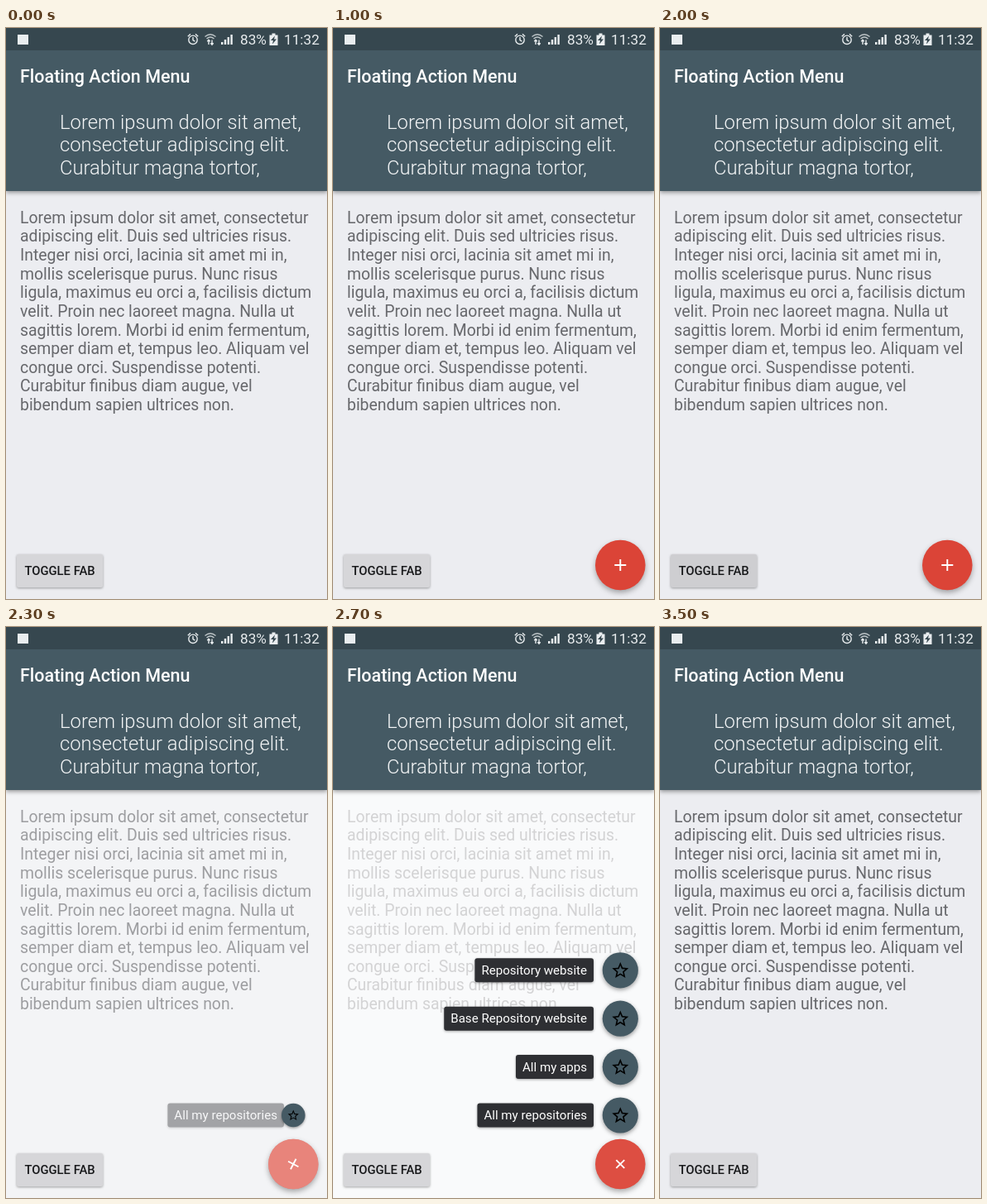
Write an HTML page that moves like this. It is 388 px wide and 690 px high and loops after 3600 ms.

```html
<!DOCTYPE html>
<html lang="en">
<head>
<meta charset="utf-8">
<title>Floating Action Menu</title>
<style>
  html, body { margin: 0; height: 100%; overflow: hidden; background: #ecedf1; }
  svg { display: block; width: 388px; height: 690px; font-family: Roboto, sans-serif; }
  .body { font-size: 19.4px; fill: #67686c; }
  .lead { font-size: 23.8px; font-weight: 300; fill: #f3f5f6; }
  .title { font-size: 21.5px; font-weight: 500; fill: #fff; }
  .status { font-size: 17.2px; fill: #e9edef; }
  .caption { font-size: 14.8px; font-weight: 500; fill: #17181a; }
  .label { font-size: 15.1px; fill: #fff; }
  .low { filter: drop-shadow(0 1px 1.5px rgba(0,0,0,.35)); }
  .mid { filter: drop-shadow(0 2px 2.5px rgba(0,0,0,.38)); }
  .high { filter: drop-shadow(0 3px 3px rgba(0,0,0,.32)); }
</style>
</head>
<body>
<svg viewBox="0 0 388 690">
  <rect width="388" height="690" fill="#ecedf1"/>
  <g id="body" class="body"></g>
  <rect id="veil" y="197" width="388" height="493" fill="#fff"/>

  <rect class="mid" y="-10" width="388" height="207" fill="#455a64"/>
  <rect width="388" height="27" fill="#36474f"/>
  <g fill="#e9edef">
    <rect x="14" y="8" width="13" height="12"/>
    <path d="M260 20v-3h2.4v3zM263.8 20v-6h2.4v6zM267.6 20v-9h2.4v9zM271.4 20V8h2.4v12z"/>
    <path d="M318.5 8.5h3V6.5h4v2h3V21h-10z"/>
    <path d="M325 9.5l-5 5.5h3l-1 4.5 5-6h-3z" fill="#36474f"/>
  </g>
  <g fill="none" stroke="#e9edef" stroke-width="1.4">
    <circle cx="226" cy="14.3" r="5.2"/>
    <path d="M226 11v3.6l2.4 1.5M219.8 10.2l3.2-2.9M232.2 10.2l-3.2-2.9"/>
    <path d="M240.5 10.5q6.5-5.5 13 0M242.5 13q4.5-3.8 9 0" opacity=".75"/>
    <path d="M245 20v-5.5M243.3 16.2l1.7-1.9 1.7 1.9M249 14.5V20M247.3 18.2l1.7 1.9 1.7-1.9"/>
  </g>
  <text class="status" x="283" y="20">83%</text>
  <text class="status" x="336" y="20">11:32</text>
  <text class="title" x="17" y="65.5">Floating Action Menu</text>
  <g id="lead" class="lead"></g>

  <rect id="button" class="low" x="13" y="636" width="104" height="40" rx="2"/>
  <text class="caption" x="65" y="661.3" text-anchor="middle">TOGGLE FAB</text>

  <g id="items"></g>
  <g id="fab" class="high">
    <circle r="30.3" fill="#db4437"/>
    <circle id="glow" r="30.3" fill="#fff"/>
    <path id="plus" d="M-7 0H7M0-7V7" stroke="#fff" stroke-width="1.9"/>
  </g>
</svg>
<script>
const LOOP = 3600, STEP = 200;
const CX = 347.3, FAB_Y = 649, LABEL_RIGHT = 315, SLIDE = 62;
const STAR = 'M22 9.24l-7.19-.62L12 2 9.19 8.63 2 9.24l5.46 4.73L5.82 21 12 17.27 18.18 21l-1.63-7.03z' +
  'M12 15.4l-3.76 2.27 1-4.28-3.32-2.88 4.38-.38L12 6.1l1.71 4.04 4.38.38-3.32 2.88 1 4.28z';

const $ = id => document.getElementById(id);
const clamp = v => Math.min(1, Math.max(0, v));
const ramp = (t, start, length = STEP) => clamp((t - start) / length);
const between = (t, show, hide) => ramp(t, show) - ramp(t, hide);
const overshoot = t => (t - 1) ** 2 * (3 * (t - 1) + 2) + 1;
const press = (t, start) => ramp(t, start, 80) - ramp(t, start + 150, 300);

function add(parent, tag, attrs = {}, text = '') {
  const node = document.createElementNS('http://www.w3.org/2000/svg', tag);
  for (const key in attrs) node.setAttribute(key, attrs[key]);
  node.textContent = text;
  return parent.appendChild(node);
}

function paragraph(id, x, y, leading, lines) {
  lines.forEach((line, i) => add($(id), 'text', { x, y: y + i * leading }, line));
}

paragraph('lead', 65, 121.5, 27.9, [
  'Lorem ipsum dolor sit amet,', 'consectetur adipiscing elit.', 'Curabitur magna tortor,'
]);
paragraph('body', 17, 235.6, 22.65, [
  'Lorem ipsum dolor sit amet, consectetur',
  'adipiscing elit. Duis sed ultricies risus.',
  'Integer nisi orci, lacinia sit amet mi in,',
  'mollis scelerisque purus. Nunc risus',
  'ligula, maximus eu orci a, facilisis dictum',
  'velit. Proin nec laoreet magna. Nulla ut',
  'sagittis lorem. Morbi id enim fermentum,',
  'semper diam et, tempus leo. Aliquam vel',
  'congue orci. Suspendisse potenti.',
  'Curabitur finibus diam augue, vel',
  'bibendum sapien ultrices non.'
]);

const items = [
  ['All my repositories', 2267, 3225],
  ['All my apps', 2307, 3160],
  ['Base Repository website', 2348, 3097],
  ['Repository website', 2400, 2956]
].map(([name, show, hide], i) => {
  const y = 590 - i * 58.4;
  const label = add($('items'), 'g', { class: 'low' });
  const plate = add(label, 'rect', { y: -14.5, height: 29, rx: 3, fill: '#2e2f33' });
  const text = add(label, 'text', { class: 'label', x: -8, y: 5.2, 'text-anchor': 'end' }, name);
  const width = text.getComputedTextLength() + 16;
  plate.setAttribute('x', -width);
  plate.setAttribute('width', width);
  const disc = add($('items'), 'g', { class: 'mid' });
  add(disc, 'circle', { r: 21.6, fill: '#455a64' });
  add(disc, 'path', { d: STAR, transform: 'translate(-12 -11.8)' });
  return { label, disc, y, show, hide };
});

function place(node, x, y, scale = 1) {
  node.setAttribute('transform', `translate(${x} ${y}) scale(${scale})`);
  node.style.display = scale > 0.001 ? '' : 'none';
}

function draw(t) {
  const open = between(t, 2200, 2958);
  $('veil').setAttribute('opacity', 0.71 * open);

  const pressed = [500, 1000, 1710, 3000].reduce((sum, start) => sum + press(t, start), 0);
  const shade = 214 - 16 * pressed;
  $('button').setAttribute('fill', `rgb(${shade},${shade},${shade + 3})`);

  // Closing runs the overshoot backwards, so every part swells before it shrinks.
  const shown = between(t, 569, 1100) + between(t, 1780, 3290);
  place($('fab'), CX, FAB_Y, overshoot(shown));
  $('glow').setAttribute('opacity', 0.34 * (ramp(t, 2100) - ramp(t, 2450, 300)));
  const turn = t < 2900 ? overshoot(open) : 1 - overshoot(1 - open);
  $('plus').setAttribute('transform', `rotate(${-135 * turn})`);

  for (const { label, disc, y, show, hide } of items) {
    const k = between(t, show, hide), size = overshoot(k);
    place(disc, CX, y, size);
    place(label, LABEL_RIGHT + SLIDE * (1 - size), y);
    label.setAttribute('opacity', clamp(2.4 * k));
  }
}

function tick() {
  draw(performance.now() % LOOP);
  requestAnimationFrame(tick);
}
tick();
</script>
</body>
</html>
```
